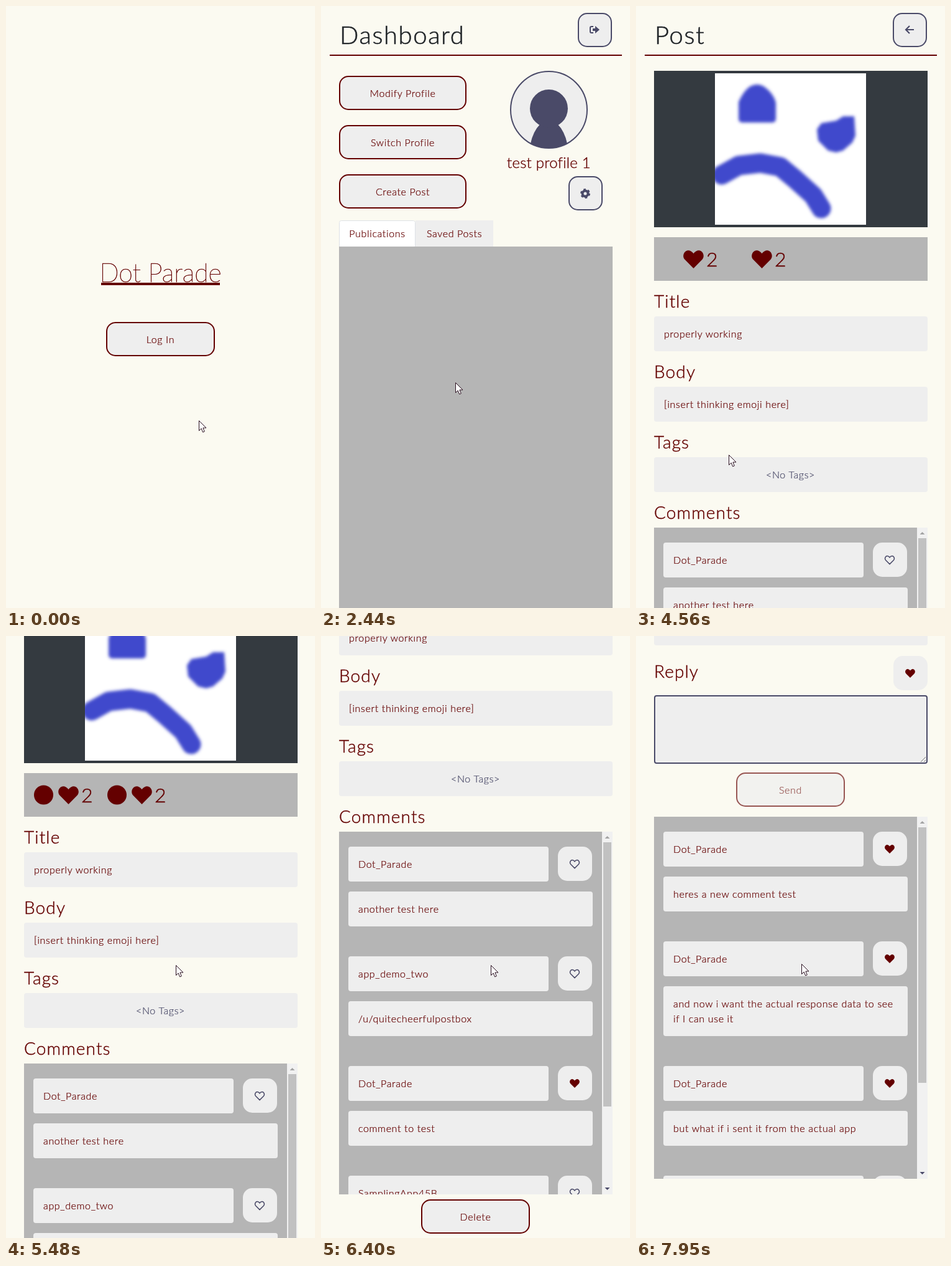
These frames come from a looping animation (497 by 966 pixels, 8000 ms). An HTML page:

```html
<!DOCTYPE html>
<html lang="en">
<head>
<meta charset="utf-8">
<title>Art app walkthrough</title>
<style>
  html, body { margin: 0; width: 100%; height: 100%; overflow: hidden; background: #fbfaf1; }
  svg { display: block; }
  text { font: 300 16px Lato, sans-serif; letter-spacing: .04em; stroke-width: .015em; }
  .logo { font-size: 41px; font-weight: 100; letter-spacing: 0; }
  .page { font-size: 40px; }
  .head { font-size: 28px; }
  .count { font-size: 32px; letter-spacing: 0; }
  .name { font-size: 24px; letter-spacing: .01em; }
</style>
</head>
<body>
<svg id="stage" width="497" height="966" viewBox="0 0 497 966"></svg>
<script>
const MAROON = '#640000', NAVY = '#4a4a68', LIGHT = '#eeeeee', GRAY = '#b5b5b5';
const LOOP = 8000;

// Drawing helpers, each returning SVG markup
const esc = s => s.replace(/</g, '&lt;').replace(/>/g, '&gt;');
const group = (id, ...parts) => `<g id="${id}">${parts.join('')}</g>`;
const rect = (x, y, w, h, fill, r = 0, more = '') =>
  `<rect x="${x}" y="${y}" width="${w}" height="${h}" rx="${r}" fill="${fill}" ${more}/>`;
const framed = (x, y, w, h, color, r = 14, fill = LIGHT) =>
  rect(x + 1, y + 1, w - 2, h - 2, fill, r, `stroke="${color}" stroke-width="2"`);
const circle = (x, y, r, fill, more = '') => `<circle cx="${x}" cy="${y}" r="${r}" fill="${fill}" ${more}/>`;
const path = (d, fill, more = '') => `<path d="${d}" fill="${fill}" ${more}/>`;
const line = (d, color, width, more = '') => path(d, 'none', `stroke="${color}" stroke-width="${width}" ${more}`);
const text = (s, x, y, fill = MAROON, cls = '', anchor = 'start') =>
  `<text x="${x}" y="${y}" fill="${fill}" stroke="${fill}" class="${cls}" text-anchor="${anchor}">${esc(s)}</text>`;
const centered = (s, x, y, fill, cls) => text(s, x, y, fill, cls, 'middle');
const button = (s, x, y, w = 175) => framed(x, y, w, 55, MAROON) + centered(s, x + w / 2, y + 33.5);
const field = (s, y) => rect(29, y, 440, 56, LIGHT, 4) + text(s, 45, y + 34);

const heart = (x, y, width, more = `fill="${MAROON}"`) =>
  `<path transform="translate(${x} ${y}) scale(${width / 16})" ${more}
    d="M8 14L1.2 7.2C-1.6 4 1.5-1 5 .3 6.5.7 7.5 2 8 2.6 8.5 2 9.5.7 11 .3 14.5-1 17.6 4 14.8 7.2Z"/>`;
const like = (x, y, on) => rect(x, y, 55, 55, LIGHT, 15) +
  (on ? heart(x + 19, y + 21, 16) : heart(x + 19.5, y + 21.5, 15, `fill="none" stroke="${NAVY}" stroke-width="1.6"`));

const logo = dy => centered('Dot Parade', 248.5, 443 + dy, MAROON, 'logo') + rect(153, 444 + dy, 191, 4, MAROON);
const header = (title, icon) => text(title, 30, 61, '#212529', 'page') +
  framed(413, 11, 55, 55, NAVY) + icon + rect(14, 78, 470, 2, MAROON);

const sadFace = (x, y, size) => `<svg x="${x}" y="${y}" width="${size}" height="${size}" viewBox="0 0 243 243">` +
  rect(0, 0, 243, 243, '#fff') + '<g filter="url(#soft)">' +
  path('M38 73V46Q45 30 55 22Q68 14 80 22Q94 32 98 47V73Q98 79 91 79H45Q38 79 38 73Z', '#4048cc') +
  path('M164 90L171 80 195 76 206 69H224L226 100 221 111 206 124 195 127 182 124 166 108Z', '#4048cc') +
  line('M11 163L38 148 73 144 105 150 128 169 158 196 171 217', '#4048cc', 31,
    'stroke-linecap="round" stroke-linejoin="round"') +
  '</g></svg>';

const happyFace = rect(38, 544, 123, 123, '#fff') +
  '<g filter="url(#soft2)" stroke-linecap="round">' +
  line('M51 572L62 575', '#ee1c24', 14) + line('M120 565H128', '#ee1c24', 19) +
  line('M57 625Q71 639 91 639Q114 637 130 619Q134 612 133 601', '#ee1c24', 15) + '</g>';

const landscape = circle(76, 438, 20.5, NAVY) +
  path('M38 506L69 471 87 491 130 433 161 475V534H38Z', NAVY);

const postRow = (y, picture, lines) => framed(37, y, 125, 125, NAVY, 0) + picture +
  framed(37, y, 125, 125, NAVY, 0, 'none') + lines.map((s, i) =>
    rect(170, y + 11 + 36 * i, 291, 32, LIGHT, 4) +
    centered(s, 315.5, y + 32.5 + 36 * i, i == 2 ? NAVY : MAROON)).join('');

// Scrollable comment list; each comment is [author, lines, liked]
function commentList(y, height, thumb, comments) {
  let top = 24;
  const rows = comments.map(([author, lines, liked]) => {
    const h = 32 + 24 * lines.length;
    const row = rect(15, top, 322, 56, LIGHT, 4) + text(author, 31, top + 33.5) + like(352, top, liked) +
      rect(15, top + 72, 393, h, LIGHT, 4) +
      lines.map((s, i) => text(s, 31, top + 105.5 + 24 * i)).join('');
    top += 120 + h;
    return row;
  }).join('');
  return `<svg x="29" y="${y}" width="440" height="${height}">` + rows +
    rect(423, 0, 17, height, '#f1f1f1') + rect(425, 17, 13, thumb, '#c1c1c1') +
    path('M427.500 11h8l-4-4z', '#a3a3a3') + path(`M427.500 ${height - 11}h8l-4 4z`, NAVY) + '</svg>';
}

const counters = (id, start, step, withIcon) => group(id, ...[0, 1].map(i => {
  const x = start + step * i;
  return (withIcon ? circle(x - 23.5, 406, 15.5, MAROON) : '') +
    heart(x, 392, 33) + text('2', x + 37, 417.5, MAROON, 'count');
}));

const soft = (id, amount) => `<filter id="${id}"><feGaussianBlur stdDeviation="${amount}"/></filter>`;
const exitIcon = line('M438 33H435Q433 33 433 35V41Q433 43 435 43H438', NAVY, 2) +
  path('M437 36H441V32L448 38 441 44V40H437Z', NAVY);
const backIcon = line('M447 38H435M440 32L434 38 440 44', NAVY, 2.2);
const gear = circle(425, 301, 4.5, 'none', `stroke="${NAVY}" stroke-width="4"`) +
  circle(425, 301, 6.5, 'none', `stroke="${NAVY}" stroke-width="3" stroke-dasharray="3.4"`);

const login = group('login', logo(0), button('Log In', 161, 507));

const accounts = group('accounts', logo(4),
  group('glow', rect(158, 500, 181, 61, '#bfdcf2', 18)),
  framed(161, 503, 175, 55, MAROON), text('Accounts', 175, 537),
  path('M312 528.500h10l-5 5z', MAROON),
  group('menu', rect(161.5, 560.5, 159, 100, '#fff', 2, 'stroke="#d4d4d0"'), rect(162, 561, 158, 32, '#f8f9fb'),
    line('M162 593.500H320M162 626.500H320', '#dfdfdf', 1),
    ...[1, 2, 3].map(n => text('account ' + n, 186, 550 + 33 * n, '#333'))));

const dashboard = group('dashboard', header('Dashboard', exitIcon),
  ...['Modify Profile', 'Switch Profile', 'Create Post'].map((s, i) => button(s, 29, 112 + 79 * i, 205)),
  circle(366.5, 166.5, 61.5, LIGHT),
  path('M337 221Q341 201 353 189H380Q392 201 396 221Q367 235 337 221Z', NAVY),
  circle(366.5, 164.5, 30.5, NAVY),
  circle(366.5, 166.5, 61.5, 'none', `stroke="${NAVY}" stroke-width="2"`),
  centered('test profile 1', 366.5, 260, MAROON, 'name'),
  framed(398, 273, 55, 55, NAVY), gear,
  rect(152, 344, 125, 42, LIGHT), rect(29.5, 344.5, 122, 45, '#fff', 3, 'stroke="#dee2e6"'),
  centered('Publications', 90.5, 371), centered('Saved Posts', 214.5, 371),
  rect(29, 386, 440, 580, GRAY),
  group('posts',
    postRow(410, landscape, ['a new test', 'for testing purposes', '<No Tags>']),
    postRow(543, happyFace, ['<No Title>', '<No Body>', '<No Tags>']),
    postRow(676, sadFace(38, 677, 123), ['properly working', '[insert thinking emoji here]', '<No Tags>'])));

const post = group('post', header('Post', backIcon),
  rect(29, 104, 440, 251, '#343a40'), sadFace(127, 108, 243), rect(29, 371, 440, 70, GRAY),
  counters('hearts', 76, 110, false), counters('sources', 84, 118, true),
  ...['Title', 'Body', 'Tags', 'Comments'].map((s, i) => text(s, 29, 484 + 113 * i, MAROON, 'head')),
  field('properly working', 498), field('[insert thinking emoji here]', 611), field('', 724),
  centered('<No Tags>', 248.5, 758, NAVY), rect(29, 837, 440, 582, GRAY),
  group('comments', commentList(837, 582, 424, [
    ['Dot_Parade', ['another test here'], false],
    ['app_demo_two', ['/u/quitecheerfulpostbox'], false],
    ['Dot_Parade', ['comment to test'], true],
    ['SamplingApp45B', [''], false]])),
  button('Delete', 161, 1427));

const reply = group('reply', rect(29, -41, 440, 56, LIGHT, 4),
  text('Reply', 29, 67, MAROON, 'head'), like(414, 32, true),
  framed(29, 95, 440, 110, NAVY, 3), line('M458 202L466 194M463 202L466 199', '#777', 1),
  `<g opacity=".65">${button('Send', 161, 219)}</g>`, rect(29, 290, 440, 581, GRAY),
  group('replies', commentList(290, 581, 410, [
    ['Dot_Parade', ['heres a new comment test'], true],
    ['Dot_Parade', ['and now i want the actual response data to see', 'if I can use it'], true],
    ['Dot_Parade', ['but what if i sent it from the actual app'], true],
    ['Dot_Parade', [''], true]])));

const pointer = group('pointer',
  group('arrow', path('M.5.5V16.5L4.200 13 6.600 18.900 9.300 17.800 6.900 12H12Z', '#fff', 'stroke="#2a1020"')),
  group('beam', line('M-3 -7.500H-1L.5-6.500 2-7.500H4M.5-6.500V7.500M-3 8.500H-1L.5 7.500 2 8.500H4', '#222', 1.2)));

const stage = document.getElementById('stage');
stage.innerHTML = soft('soft', 2.5) + soft('soft2', 1.4) + login + accounts + dashboard + post + reply + pointer;
const parts = Object.fromEntries([...stage.querySelectorAll('g[id]')].map(g => [g.id, g]));

// When each part is on stage, in ms
const shown = {
  login: [0, 690], accounts: [690, 2280], glow: [1110, 2050], menu: [1110, 1980],
  dashboard: [2280, 3700], posts: [2520, 3700],
  post: [3700, 7240], hearts: [4480, 4660], sources: [4660, 7240], comments: [4480, 7240],
  reply: [7240, LOOP], replies: [7400, LOOP]
};

// Keyframes: [time, values...]
const pointerKeys = [
  [0, 310, 665], [80, 310, 665], [200, 316, 648], [350, 288, 580], [480, 266, 535],
  [1140, 266, 535], [1480, 250, 556], [1795, 240, 582], [2220, 240, 582], [3060, 135, 680],
  [3370, 99, 770], [4400, 99, 770], [4558, 149, 720], [4830, 243, 573], [5010, 243, 573],
  [5150, 273, 528], [6800, 273, 528], [7120, 203, 640], [7740, 203, 640], [7930, 266, 526]
];
const scrollKeys = [
  [5240, 0], [5310, 30], [5478, 151], [5620, 245], [5780, 300],
  [6100, 300], [6170, 340], [6398, 523], [6540, 600]
];

const TICK = 230 / 3, PHASE = 35;
const onTick = t => PHASE + TICK * Math.floor((t - PHASE) / TICK);

function sample(keys, t) {
  const next = keys.findIndex(k => k[0] > t);
  if (next < 0) return keys[keys.length - 1].slice(1);
  if (next == 0) return keys[0].slice(1);
  const a = keys[next - 1], b = keys[next], p = (t - a[0]) / (b[0] - a[0]);
  return a.slice(1).map((v, i) => v + (b[i + 1] - v) * p);
}

const show = (part, on) => { part.style.display = on ? '' : 'none'; };

function frame(now) {
  const t = now % LOOP, moved = onTick(t);
  for (const id in shown) show(parts[id], t >= shown[id][0] && t < shown[id][1]);
  const [x, y] = sample(pointerKeys, moved).map(Math.round);
  const overMenu = y > 561 && t < shown.menu[1] && t >= shown.menu[0];
  show(parts.beam, overMenu);
  show(parts.arrow, !overMenu);
  parts.pointer.setAttribute('transform', `translate(${x} ${y})`);
  parts.post.setAttribute('transform', `translate(0 ${-Math.round(sample(scrollKeys, moved)[0])})`);
  requestAnimationFrame(frame);
}
requestAnimationFrame(frame);
</script>
</body>
</html>
```
